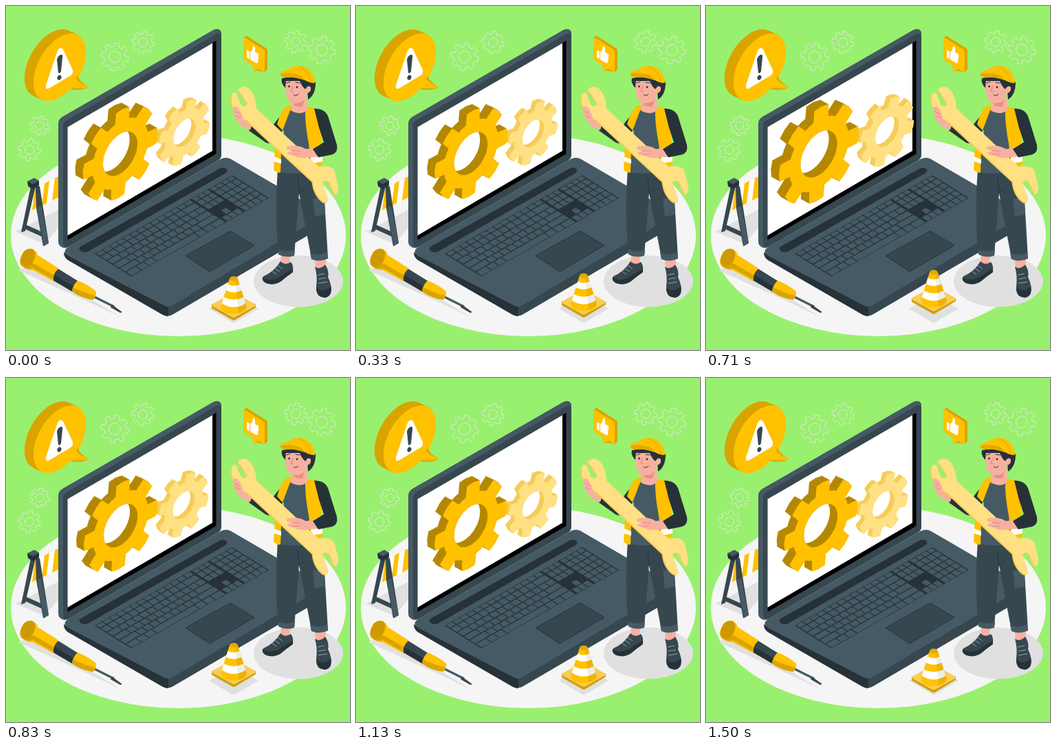
Recreate the animation shown at these times as an HTML page. Size 500 by 500 pixels, loop 1540 ms.

```html
<!DOCTYPE html>
<html lang="en">
<head>
<meta charset="utf-8">
<title>Maintenance</title>
<style>
html, body { margin: 0; width: 100%; height: 100%; overflow: hidden; background: #99f06e; }
svg { display: block; width: 100%; height: 100%; }
</style>
</head>
<body>
<svg viewBox="0 0 500 500" xmlns="http://www.w3.org/2000/svg">
<rect width="500" height="500" fill="#99f06e"/>
<ellipse cx="250.500" cy="333.500" rx="243.500" ry="146.500" fill="#f5f5f5"/>
<g id="outlines" fill="none" stroke="#e3e6e1" stroke-width="1" stroke-linejoin="round"/>

<!-- ground shadows -->
<g fill="#e0e0e0">
  <ellipse cx="425" cy="400" rx="65" ry="37.500"/>
  <path d="M295 440L331 420L367 440L331 461Z"/>
  <path d="M18 384L30 379L120 424L168 453L124 432Z"/>
  <path d="M14 328L76 296V322L56 346Z"/>
</g>

<!-- warning bubble -->
<g>
  <g id="disc"/>
  <path d="M104 101Q106 109 120 118Q110 124 94 121Z" fill="#e0a800"/>
  <path d="M101 105Q108 113 120 118Q108 121 92 118Z" fill="#ffc100"/>
  <path d="M75 65Q79 58 83 63L97 93Q98 98 94 101L62 120Q57 122 58 115Z" fill="#fff"/>
  <path d="M74 78Q75 73 79 71Q83 70 82 75L80 95Q78 99 76 97Z" fill="#37474f"/>
  <ellipse cx="77.500" cy="104" rx="2.800" ry="3.700" transform="rotate(25 77.500 104)" fill="#37474f"/>
</g>

<!-- approval bubble -->
<path d="M346 46L349 43L379 62Q380 63 380 66V92L376 96L364 94L361 96Z" fill="#d9a400"/>
<path d="M345 47Q345 45 347 46L374 63Q376 64 376 67V93Q376 97 373 95L366 91L361 96L358 86L347 79Q345 78 345 75Z" fill="#ffc100"/>
<path d="M350 64L354 66V77L350 75ZM355 67L358 64L359 58Q363 58 362 67L366 69Q368 70 367 73L366 82Q365 84 362 82L355 78Z" fill="#fff"/>

<!-- barricade -->
<path d="M36 268L76 248V279L38 297Z" fill="#fff"/>
<path d="M42 265L49 261L45 293L38 297ZM56 258L63 254L59 287L52 290ZM71 250L76 248V278L67 283Z" fill="#ffc100"/>
<path d="M43 262L49 262L62 344L54 349L44 294Z" fill="#37474f"/>
<path d="M36 262L43 262L28 327L22 329Z" fill="#37474f"/>
<path d="M27 317L56 330V337L25 323Z" fill="#37474f"/>
<path d="M45 293L51 291L62 345L55 349Z" fill="#455a64"/>
<path d="M31 255L41 250L48 254V261L39 266L32 262Z" fill="#263238"/>
<path d="M31 255L41 250L48 254L39 259Z" fill="#455a64"/>

<!-- laptop base -->
<path d="M234 435L460 305V317Q460 321 455 324L243 448Q238 451 234 450Z" fill="#37474f"/>
<path d="M84 358L236 436V451Q232 451 228 449L91 370Q84 366 84 358Z" fill="#263238"/>
<path d="M88 352L313 222Q320 219 326 222L455 297Q463 302 455 308L242 435Q236 439 229 435L90 363Q82 358 88 352Z" fill="#455a64"/>
<path d="M108 350L311 236Q315 234 319 236Q324 239 319 243L119 357Q115 359 110 357Q104 353 108 350Z" fill="#263238"/>
<g id="keys"/>
<path d="M261 363L326 327L361 348L296 386Z" fill="#37474f" stroke="#263238"/>

<!-- laptop lid -->
<path d="M76 171Q76 165 82 161L301 35Q310 31 313 38V216Q313 222 308 225L92 350Q84 354 79 349Q76 347 76 342Z" fill="#455a64"/>
<path d="M83 174Q83 169 88 166L305 41Q313 37 313 46V215Q313 221 308 224L92 349Q83 353 83 344Z" fill="#37474f"/>
<path d="M89.500 176L305.500 50.500V215L89.500 340Z" fill="#000"/>
<path d="M89.500 176L300 54V210.500L89.500 333.500Z" fill="#fff"/>
<g id="cogs"/>

<!-- screwdriver -->
<path d="M127 422L157 437" stroke="#455a64" stroke-width="3.200"/>
<path d="M154 434L169 445L166 446L152 438Z" fill="#37474f"/>
<path d="M22 364Q26 351 38 353Q45 356 46 362L76 381L69 400L39 384Q29 384 22 377Q19 372 22 364Z" fill="#ffc100"/>
<path d="M22 364Q18 374 24 379Q31 384 39 381L69 398L71 392L40 374Q30 376 22 364Z" fill="#d9a400"/>
<path d="M22 365Q27 351 38 353Q44 356 42 366Q38 377 30 379Q20 376 22 365Z" fill="#cc9a00"/>
<path d="M76 382L105 400L98 416L69 399Q68 389 76 382Z" fill="#37474f"/>
<path d="M70 391L101 409L98 416L69 399Z" fill="#263238"/>
<path d="M104 399Q120 405 131 415Q132 421 127 427Q110 425 96 415Q97 406 104 399Z" fill="#ffc100"/>
<path d="M97 409Q114 417 130 421L127 427Q110 425 96 415Z" fill="#d9a400"/>

<!-- cone, at rest -->
<g id="cone">
  <path d="M299 434L331 440L363 434V439L333 457Q331 458 329 457L299 440Z" fill="#cf9f0c"/>
  <path d="M300 434L329 418Q331 417 333 418L362 434Q364 435 362 437L333 453Q331 454 329 453L300 437Q298 435 300 434Z" fill="#f8cd55"/>
  <path d="M325 397L312 438Q314 448 331 448Q348 448 350 438L337 397Z" fill="#ffc100"/>
  <path d="M322.500 405Q331 410 339.500 405L342.400 414Q331 420 319.600 414ZM316.500 424Q331 431 345.500 424L348.300 433Q331 444 313.700 433Z" fill="#fff"/>
  <path d="M333 397L337 397L350 438Q348 445 338 447Z" fill="#000" opacity=".07"/>
  <ellipse cx="331" cy="397" rx="6" ry="3.500" fill="#e0aa00"/>
</g>

<!-- worker: legs -->
<path d="M400 360L413 361L412 376L399 375ZM449 367L465 368L464 383L450 383Z" fill="#f7b0a0"/>
<path d="M399 371Q406 378 414 372Q418 377 417 385Q408 391 400 399Q391 406 378 402Q371 398 374 393Q390 386 399 371Z" fill="#37474f"/>
<path d="M373 394Q383 402 399 393Q409 386 417 382V387Q408 393 400 400Q390 407 378 403Q371 399 373 394Z" fill="#263238"/>
<path d="M449 379Q456 384 464 376Q470 385 468 394Q475 409 472 418Q467 426 456 422Q450 418 451 407Q453 393 449 379Z" fill="#37474f"/>
<path d="M451 409Q460 418 472 408Q474 422 464 424Q451 423 451 409Z" fill="#263238"/>
<path d="M390 381L398 386M386 385L393 390M395 377L402 382M453 391L463 389M454 397L465 395M454 403L467 401" stroke="#90a4ae" fill="none"/>
<path d="M395 236L452 232Q461 254 463 282L468 367Q456 372 444 367L426 272L419 362Q407 366 396 361Q390 300 395 236Z" fill="#37474f"/>
<path d="M396 354Q408 359 420 354L419 363Q407 367 396 361ZM442 359Q456 364 467 358L468 367Q456 373 444 368Z" fill="#455a64"/>
<path d="M446 280L462 278L464 303L449 306Z" fill="#455a64"/>
<path d="M426 272L424 250M426 272L434 266" stroke="#263238" fill="none"/>

<!-- worker: body -->
<path d="M402 154Q420 146 441 152L450 180L449 238Q420 248 394 240L404 190Z" fill="#455a64"/>
<path d="M399 160Q392 167 384 180L361 166L353 181L377 198Q384 202 389 196L404 179Z" fill="#263238"/>
<path d="M409 145Q400 150 394 172L402 181L411 157L416 145ZM435 147L448 148Q457 170 459 198L460 230L444 238L440 200Q434 170 435 147Z" fill="#ffc100"/>
<path d="M391 205Q396 207 400 210L399 242Q393 243 389 238Z" fill="#ffc100"/>
<path d="M390 219L400 223V229L390 226ZM443 220L460 217V226L444 229Z" fill="#fff"/>
<path d="M418 133L437 132L438 151Q429 160 414 152Z" fill="#f7b0a0"/>
<path d="M418 139Q426 144 434 136L431 146Q423 147 418 143Z" fill="#e88f82"/>

<!-- worker: head -->
<path d="M401 105Q399 112 406 119L420 112L438 122L439 136Q450 129 450 111Q440 98 401 105Z" fill="#263238"/>
<path d="M407 109Q404 126 411 138Q417 145 428 138Q435 134 437 127Q444 126 443 118Q439 114 435 120L430 109Z" fill="#f7b0a0"/>
<path d="M426 107Q430 117 435 121L440 114L437 104Z" fill="#263238"/>
<path d="M399 100Q398 94 409 93Q418 85 433 88Q448 94 449 112Q441 112 435 108Q420 102 407 104Z" fill="#ffc100"/>
<path d="M398 99Q411 95 426 100Q432 103 434 108Q417 102 406 104Q400 103 398 99Z" fill="#e0aa00"/>
<path d="M426 88Q440 94 443 110" stroke="#d9a400" fill="none"/>
<path d="M408 112L413 110M421 111L427 112M418 129Q421 132 425 128" stroke="#263238" fill="none" stroke-linecap="round"/>
<circle cx="411.500" cy="117" r="1.400" fill="#263238"/>
<circle cx="423" cy="118" r="1.400" fill="#263238"/>
<path d="M417 116L414 124L418 125" stroke="#d97f73" fill="none"/>

<!-- worker: wrench and hands -->
<path d="M331 149Q336 145 343 151L359 168L355 180Q344 178 337 169Q330 161 331 149Z" fill="#f7b0a0"/>
<g id="wrench"/>
<path d="M330 147Q335 144 339 150L343 158Q346 164 341 166Q333 162 330 153Z" fill="#f7b0a0"/>
<path d="M332 153L340 157M333 159L341 162" stroke="#df8d80" fill="none"/>
<path d="M456 205L436 208Q424 201 410 204Q405 206 410 209L416 210L409 213Q409 217 418 217Q428 223 440 220L456 219Z" fill="#f7b0a0"/>
<path d="M416 210L428 211M416 216L427 215" stroke="#df8d80" fill="none"/>
<path d="M448 149Q463 149 468 160L481 202Q483 213 474 216L454 220L446 208L462 198L455 177Z" fill="#263238"/>
</svg>

<script>
const LOOP = 1540;
const byId = id => document.getElementById(id);
const iso = (cx, cy) => ([u, v]) => [cx + 0.866 * u, cy + v - 0.5 * u];
const path = pts => "M" + pts.map(p => p.map(n => n.toFixed(1)).join(" ")).join("L") + "Z";
const shape = (d, fill, extra = "") => `<path d="${d}" fill="${fill}" ${extra}/>`;

function polar(r, deg) {
  const a = deg * Math.PI / 180;
  return [r * Math.cos(a), r * Math.sin(a)];
}

function ring(r) {
  return Array.from({ length: 60 }, (_, i) => polar(r, i * 6));
}

// Eight tapered teeth with short arcs between them.
function teeth(outer, inner, turn) {
  const pts = [];
  for (let i = 0; i < 8; i++) {
    const a = i * 45 + turn;
    pts.push(polar(inner, a - 14), polar(outer, a - 10), polar(outer * 1.01, a),
      polar(outer, a + 10), polar(inner, a + 14), polar(inner, a + 22.5));
  }
  return pts;
}

function solidGear({ id, at, outer, inner, hole, turn, depth: [dx, dy], face, side }) {
  const put = iso(...at);
  const back = ([x, y]) => [x + dx, y + dy];
  const pts = teeth(outer, inner, turn).map(put);
  const bore = ring(hole).map(put);
  const walls = pts.map((p, i) => {
    const q = pts[(i + 1) % pts.length];
    return shape(path([p, q, back(q), back(p)]), side, `stroke="${side}" stroke-width=".5"`);
  });
  return walls.join("") +
    shape(path(pts), face, `stroke="${face}" stroke-linejoin="round"`) +
    shape(path(bore), side) +
    `<clipPath id="${id}"><path d="${path(bore)}"/></clipPath>` +
    shape(path(bore.map(back)), "#fff", `clip-path="url(#${id})"`);
}

function outlineGear([cx, cy, r]) {
  const pts = teeth(r, r * 0.76, 10).map(([x, y]) => [cx + x, cy + y]);
  return `<path d="${path(pts)}"/><circle cx="${cx}" cy="${cy}" r="${r * 0.42}"/>`;
}

function keyboard() {
  const at = (u, v) => [129 + 200 * u + 53 * v, 360 - 114 * u + 33 * v];
  const quad = (u0, v0, u1, v1) => path([at(u0, v0), at(u1, v0), at(u1, v1), at(u0, v1)]);
  let d = "";
  const row = (u, end, v0, v1, widths) => {
    const unit = (end - u) / widths.reduce((a, b) => a + b);
    for (const w of widths) {
      d += quad(u + 0.003, v0 + 0.012, u + w * unit - 0.003, v1 - 0.012);
      u += w * unit;
    }
  };
  const same = n => Array(n).fill(1);
  const rows = [same(14), [...same(12), 2], [1.5, ...same(12)], [1.8, ...same(10), 2],
    [2.3, ...same(9), 2.6], [1.3, 1, 1, 5.5, 1, 1, 1.3]];
  const edges = [0, 0.13, 0.31, 0.48, 0.65, 0.82, 1];
  rows.forEach((widths, i) => {
    const v0 = edges[i], v1 = edges[i + 1];
    row(0.004, 0.69, v0, v1, widths);
    if (i < 3) row(0.7, 0.82, v0, v1, same(3));
    if (i === 4) row(0.74, 0.78, v0, v1, [1]);
    if (i === 5) row(0.7, 0.82, v0, v1, same(3));
    row(0.83, 0.996, v0, v1, same(4));
  });
  return shape(quad(0, 0, 1, 1), "#263238") + shape(d, "#455a64");
}

byId("disc").innerHTML = Array.from({ length: 14 }, (_, i) =>
  shape(path(ring(44).map(iso(65 + i, 83 + i * 6 / 13))), i < 13 ? "#d9a400" : "#ffc100")).join("");

byId("outlines").innerHTML = [[158, 74, 20], [199, 53, 16], [421, 52, 16],
  [459, 64, 20], [49, 174, 14], [34, 209, 16]].map(outlineGear).join("");

byId("keys").innerHTML = keyboard();

byId("cogs").innerHTML = [
  { id: "boreB", at: [257.5, 185], outer: 41, inner: 31, hole: 18, turn: 18,
    depth: [-6, -3.5], face: "#ffe083", side: "#f5cc58" },
  { id: "boreA", at: [167, 214.5], outer: 60, inner: 45, hole: 28, turn: 4,
    depth: [-11, -6], face: "#ffc100", side: "#b38700" }
].map(solidGear).join("");

const wrench = "M338 121Q344 114 353 120Q363 129 364 149L455 234Q469 230 477 238" +
  "L483 262Q484 272 478 274L470 256Q465 251 460 256L468 279Q470 287 462 285" +
  "Q448 275 446 255L350 166Q332 158 328 140V130Q330 124 335 127L341 143" +
  "Q347 149 351 142L341 126Q337 124 338 121Z";
byId("wrench").innerHTML = shape(wrench, "#f5cc58", 'transform="translate(-1.5 1.2)"') +
  shape(wrench, "#ffe083");

function track(keys, t) {
  for (let i = 1; i < keys.length; i++) {
    const [t0, a] = keys[i - 1], [t1, b] = keys[i];
    if (t <= t1) return a + (b - a) * (t - t0) / (t1 - t0);
  }
  return keys[keys.length - 1][1];
}

// Times count from the start of the beat, 50 ms ahead of the clock.
const BEAT = [[0, 1], [165, 1.1], [310, 1], [590, 1], [755, 1.1], [900, 1], [LOOP, 1]];
const LIFT = [[0, 0], [LOOP / 2, -10], [LOOP, 0]];
const cogs = byId("cogs"), cone = byId("cone");

function draw(ms) {
  const t = (ms + 50) % LOOP;
  cogs.setAttribute("transform", `translate(198 209) scale(${track(BEAT, t)}) translate(-198 -209)`);
  cone.setAttribute("transform", `translate(0 ${track(LIFT, t)})`);
}

const start = performance.now();
function tick() {
  draw(performance.now() - start);
  requestAnimationFrame(tick);
}
tick();
</script>
</body>
</html>
```
